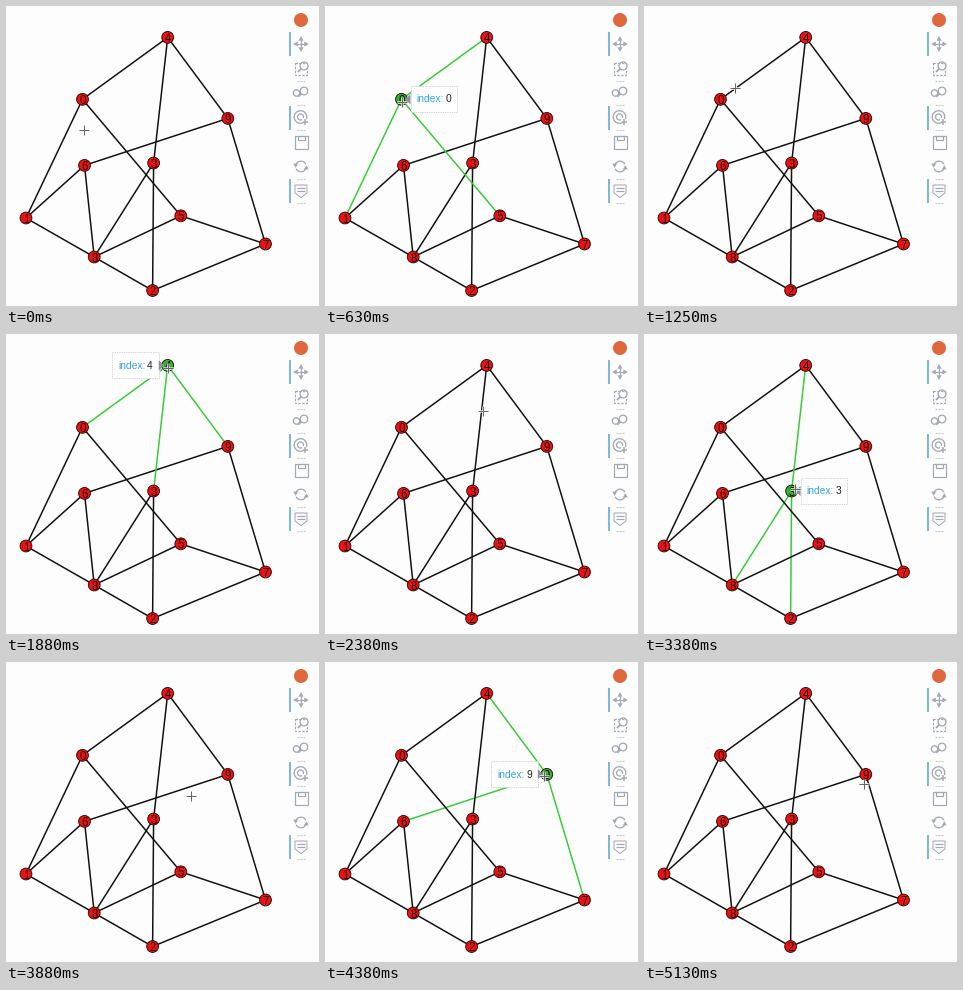
These frames come from a looping animation (313x300 px, 5260 ms). A matplotlib script:

```python
import math
import numpy as np
import matplotlib.pyplot as plt
from matplotlib.animation import FuncAnimation
from matplotlib.collections import LineCollection
from matplotlib.patches import Circle, Polygon, Rectangle

W, H, DPI = 313, 300, 64
LOOP, TICK, STEP, LAST = 5260, 20, 125, 41

RED, GREEN, BLACK = "#ee1111", "#2fb52f", "#101010"
EDGE_GREEN = "#36cc36"
ICON, ACTIVE = "#a4a8b4", "#80b7e0"
BAR_X, BAR_Y, PITCH = 295, 38, 24.5

NODES = [(76.5, 93.3), (20, 212), (146.6, 284.5), (147.6, 157), (161.7, 31.4),
         (174.8, 209.8), (78.5, 159.4), (259.5, 238), (88.2, 251), (221.8, 112.4)]

# One ring through every node, plus a few chords
RING = [0, 4, 9, 6, 1, 8, 3, 2, 7, 5]
EDGES = [*zip(RING, np.roll(RING, -1)), (0, 1), (7, 9), (3, 4),
         *((8, n) for n in (2, 5, 6))]

# Pointer stops: arrive, leave, (x, y)
STOPS = [(0, 0, (78, 124)), (4, 7, (77, 96)), (10, 10, (91, 82)),
         (14, 17, (162, 34)), (22, 28, (151, 155)), (34, 37, (219, 114)),
         (41, 41, (220, 122))]


def pt(px):
    return px * 72 / DPI


fig = plt.figure(figsize=(W / DPI, H / DPI), dpi=DPI, facecolor="#fdfdfd")
ax = fig.add_axes([0, 0, 1, 1])
ax.set_xlim(0, W)
ax.set_ylim(H, 0)
ax.axis("off")


def stroke(xs, ys, color=ICON, width=1.2, z=1, **kw):
    return ax.plot(xs, ys, color=color, lw=pt(width), zorder=z,
                   solid_capstyle="butt", **kw)[0]


def shape(points, fc=ICON, ec="none", z=1, **kw):
    return ax.add_patch(Polygon(points, fc=fc, ec=ec, lw=pt(1), zorder=z, **kw))


def box(x, y, w, h, **kw):
    ax.add_patch(Rectangle((x, y), w, h, fill=False, ec=ICON, lw=pt(1.2), **kw))


def arc(x, y, r, start=0, sweep=360):
    a = np.radians(np.linspace(start, start + sweep, 40))
    stroke(x + r * np.cos(a), y + r * np.sin(a), width=1.3)


def arrowhead(x, y, angle, size=3):
    a = np.radians(angle + np.array([0, 120, 240]))
    shape(np.column_stack([x + size * np.cos(a), y + size * np.sin(a)]))


def lens(x, y, r):
    arc(x, y, r)
    stroke([x - r * 0.7, x - r * 1.5], [y + r * 0.7, y + r * 1.5], width=1.8)


def pan_icon(x, y):
    for a in range(0, 360, 90):
        dx, dy = math.cos(math.radians(a)), math.sin(math.radians(a))
        stroke([x, x + 5 * dx], [y, y + 5 * dy])
        arrowhead(x + 4.8 * dx, y + 4.8 * dy, a)


def box_zoom_icon(x, y):
    box(x - 6.5, y - 6, 12, 12, ls=(0, (2, 1.2)))
    lens(x + 3, y - 2.5, 4)


def lenses_icon(x, y):
    arc(x - 4.5, y, 3.2)
    lens(x + 3, y - 2, 3.8)


def wheel_icon(x, y):
    arc(x - 0.5, y - 0.5, 6.3, 60, 320)
    arc(x - 0.5, y - 0.5, 3, 60, 320)
    stroke([x + 1.5, x + 7], [y + 4, y + 4], width=1.5)
    stroke([x + 4.2, x + 4.2], [y + 1.5, y + 7], width=1.5)


def save_icon(x, y):
    box(x - 6.5, y - 6.5, 13, 13)
    box(x - 3, y - 6.5, 6.5, 4)


def reset_icon(x, y):
    for a in (0, 180):
        arc(x, y, 5.3, a + 25, 130)
        s = math.cos(math.radians(a))
        arrowhead(x + 5.3 * s, y + 1.5 * s, a - 90, 2.8)


def hover_icon(x, y):
    shape([(x - 6, y - 6), (x + 6, y - 6), (x + 6, y + 2), (x, y + 6.5),
           (x - 6, y + 2)], fc="none", ec=ICON)
    for dy in (-3, 0):
        stroke([x - 4, x + 4], [y + dy, y + dy])


def draw_toolbar():
    ax.add_patch(Circle((BAR_X, 14), 7, fc="#e0683f", ec="none"))
    icons = [pan_icon, box_zoom_icon, lenses_icon, wheel_icon,
             save_icon, reset_icon, hover_icon]
    active = (pan_icon, wheel_icon, hover_icon)
    for i, icon in enumerate(icons):
        y = BAR_Y + PITCH * i
        icon(BAR_X, y)
        if icon in active:
            stroke([BAR_X - 11.5] * 2, [y - 12, y + 12], ACTIVE, 2)
        if icon not in (pan_icon, save_icon):
            stroke([BAR_X - 4, BAR_X + 4], [y + PITCH / 2] * 2,
                   "#c4c6cc", 1, ls=(0, (2, 1)))


draw_toolbar()

lines = LineCollection([(NODES[a], NODES[b]) for a, b in EDGES],
                       linewidths=pt(1.5), zorder=2)
ax.add_collection(lines)

dots = []
for i, (x, y) in enumerate(NODES):
    dots.append(ax.add_patch(Circle((x, y), 5.9, ec="#300808", lw=pt(0.9), zorder=3)))
    ax.text(x, y + 0.2, str(i), family="Liberation Sans", fontsize=pt(11.5),
            color="#1c0505", ha="center", va="center_baseline", zorder=4)

TIP_W, TIP_H, GAP = 46.5, 26, 9
tip_box = ax.add_patch(Rectangle((0, 0), TIP_W, TIP_H, fc="#fefefe", ec="#cfd2dc",
                                 lw=pt(0.9), ls=(0, (1.5, 1)), zorder=5))
tip_arrow = shape([(0, 0), (1, 0), (0, 1)], "#8b9199", z=6)
tip_font = dict(family="Liberation Sans", fontsize=pt(10.3), zorder=6)
tip_key = ax.text(0, 0, "index:", color="#35a5e4", **tip_font)
tip_val = ax.text(0, 0, "", color="#222222", ha="right", **tip_font)
tip = [tip_box, tip_arrow, tip_key, tip_val]

halo = [stroke([], [], "white", 3, 7, alpha=0.65) for _ in range(2)]
cross = [stroke([], [], "#666666", 1, 8) for _ in range(2)]


def pointer(k):
    for (_, leave, p), (arrive, stay, q) in zip(STOPS, STOPS[1:]):
        if k <= stay:
            u = min((k - leave) / (arrive - leave), 1)
            s = u * u * (3 - 2 * u)
            return [a + (b - a) * s for a, b in zip(p, q)]


def hovered(k):
    p = pointer(max(k, 0))
    return next((i for i, n in enumerate(NODES) if math.dist(p, n) < 6.5), None)


def place_tip(node):
    for part in tip:
        part.set_visible(node is not None)
    if node is None:
        return
    x, y = NODES[node]
    side = 1 if x < 150 else -1
    edge = x + side * GAP
    left = min(edge, edge + side * TIP_W)
    tip_box.set_xy((left, y - TIP_H / 2))
    tip_arrow.set_xy([(edge, y - 5), (edge, y + 5), (edge - side * 6, y)])
    tip_key.set_position((left + 6, y + 3.2))
    tip_val.set_position((left + TIP_W - 6, y + 3.2))
    tip_val.set_text(str(node))


def draw(i):
    k = min((i * TICK + TICK // 2) // STEP, LAST)
    node = hovered(k)
    place_tip(node)
    # the highlight follows the tooltip one step later
    lit = node if node is not None and hovered(k - 1) == node else None
    lines.set_color([EDGE_GREEN if lit in e else BLACK for e in EDGES])
    for j, dot in enumerate(dots):
        dot.set_facecolor(GREEN if j == lit else RED)
    x, y = (round(v) - 0.5 for v in pointer(k))
    for h, v in (halo, cross):
        h.set_data([x - 5, x + 5], [y, y])
        v.set_data([x, x], [y - 5, y + 5])
    return [lines, *dots, *tip, *halo, *cross]


anim = FuncAnimation(fig, draw, frames=LOOP // TICK, interval=TICK,
                     repeat=True, repeat_delay=0, blit=False)
plt.show()
```
